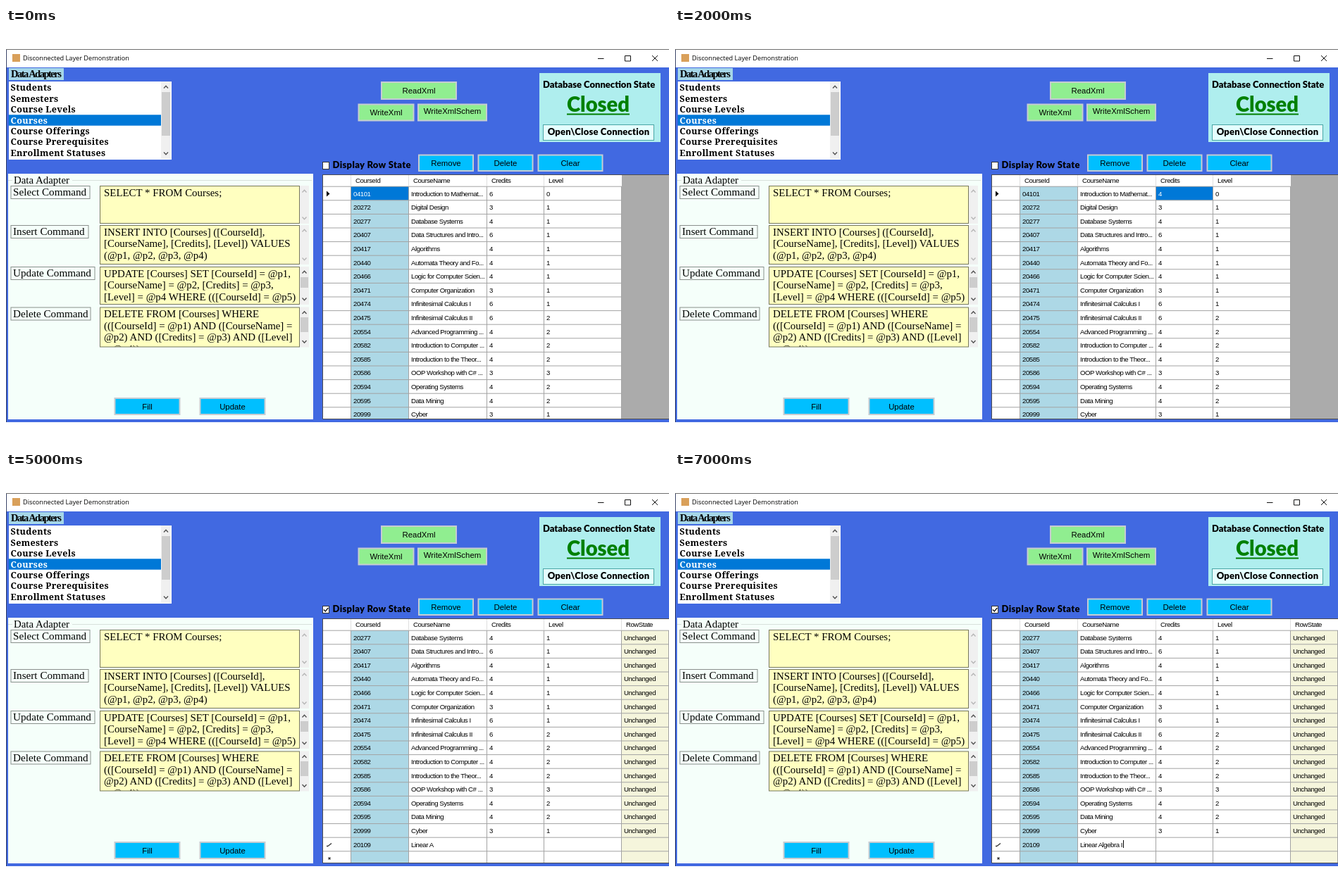
These frames come from a looping animation (941 px wide and 591 px high, 8000 ms). An HTML page:

```html
<!DOCTYPE html>
<html lang="en">
<head>
<meta charset="utf-8">
<title>Disconnected Layer Demonstration</title>
<style>
  html, body { margin: 0; width: 100%; height: 100%; overflow: hidden; background: #fff; }
  svg { display: block; }
  text { white-space: pre; }
  .title { font: 9.2px "Open Sans", sans-serif; }
  .heading { font: bold 14.5px "Liberation Serif", serif; letter-spacing: -1.5px; }
  .list { font: 900 12.6px "Noto Serif", serif; letter-spacing: .3px; }
  .geo { font: 900 13px Lato, sans-serif; }
  .button { font: 11.4px "Liberation Sans", sans-serif; text-anchor: middle; }
  .serif { font: 14.9px "Liberation Serif", serif; }
  .cell { font: 9.6px "Liberation Sans", sans-serif; letter-spacing: -.45px; }
</style>
</head>
<body>
<svg id="stage" width="941" height="591" viewBox="0 0 941 591"></svg>
<script>
const rect = (x, y, w, h, fill, stroke = 'none', width = 1) =>
  `<rect x="${x}" y="${y}" width="${w}" height="${h}" fill="${fill}" stroke="${stroke}" stroke-width="${width}"/>`;
const text = (cls, x, y, s, fill = '#000', style = '') =>
  `<text class="${cls}" x="${x}" y="${y}" fill="${fill}" style="${style}">${s}</text>`;
const path = (d, stroke, width = 1, fill = 'none') =>
  `<path d="${d}" stroke="${stroke}" stroke-width="${width}" fill="${fill}"/>`;
const clip = (id, x, y, w, h) => `<clipPath id="${id}">${rect(x, y, w, h, '#000')}</clipPath>`;

function button(x, y, w, h, label, fill = '#00bfff', dy = 4) {
  return rect(x + 1, y + 1, w - 2, h - 2, fill, '#c6ccd2', 2) +
    text('button', x + w / 2, y + h / 2 + dy, label);
}

function scrollbar(x, y, w, h, thumb) {
  const cx = x + w / 2, color = thumb ? '#505050' : '#b5b5b5';
  const arrow = (cy, d) => path(`M${cx - 3} ${cy + d}L${cx} ${cy - d * 1.2}L${cx + 3} ${cy + d}`, color, 1.3);
  return rect(x, y, w, h, '#f0f0f0') + arrow(y + 8, 1.5) + arrow(y + h - 8, -1.5) +
    (thumb ? rect(x + 1, thumb[0], w - 2, thumb[1], '#cdcdcd') : '');
}

function command(name, labelWidth, y, h, lines, thumb) {
  const id = 'clip' + name;
  return rect(7, y + .5, labelWidth, 18, 'none', '#8a8f8c') +
    text('serif', 10, y + 14, name + ' Command', '#000', 'font-size:15.2px') +
    rect(133.5, y + .5, 283, h - 1, '#ffffc0', '#77775c') +
    clip(id, 134, y + 1, 282, h - 2) + `<g clip-path="url(#${id})">` +
    lines.map((s, i) => text('serif', 139, y + 14.8 + 16.4 * i, s)).join('') + '</g>' +
    scrollbar(417, y, 13, h, thumb);
}

function windowFrame() {
  return rect(0, 30, 941, 530, '#4169e1') + rect(0, 31, 941, 25, '#fff') +
    rect(0, 30, 941, 1, '#6e6e6e') + rect(0, 31, 1, 529, '#3a4468') +
    rect(9, 37, 11, 11, '#d9a05a') +
    text('title', 24, 46.3, 'Disconnected Layer Demonstration') +
    path('M840 43.5h8.5M878.5 39.5h8v7.5h-8zM917 39l8 8M925 39l-8 8', '#111');
}

function adapterList() {
  const names = ['Students', 'Semesters', 'Course Levels', 'Courses', 'Course Offerings',
    'Course Prerequisites', 'Enrollment Statuses'];
  return rect(4, 57, 78, 17, '#a5d6e8') + text('heading', 7, 70, 'Data Adapters') +
    rect(4, 76, 231, 111, '#fff') + rect(4, 123.3, 216, 15.4, '#0078d7') +
    names.map((s, i) => text('list', 6.5, 89.2 + 15.45 * i, s, i === 3 ? '#fff' : '#000')).join('') +
    scrollbar(220, 76, 14, 110, [91, 62]);
}

function connectionPanel() {
  return rect(757, 64, 172, 98, '#afeeee') +
    text('geo', 762, 85, 'Database Connection State') +
    text('geo', 840.5, 118.5, 'Closed', '#008000', 'font-size:29.2px;text-anchor:middle') +
    rect(796, 121.5, 89, 2, '#008000') +
    rect(762.5, 137.5, 157, 22, '#e4ffff', '#4aa5a5') +
    text('geo', 841, 152, 'Open\\Close Connection', '#000', 'letter-spacing:.2px;text-anchor:middle');
}

function adapterPanel() {
  return rect(3, 207, 433, 349, '#f5fffa') +
    path('M3 216.5h6M94 216.5h340', '#d8e0dc') + text('serif', 11, 220.5, 'Data Adapter') +
    command('Select', 112, 224, 54, ['SELECT * FROM Courses;']) +
    command('Insert', 110, 280, 56, ['INSERT INTO [Courses] ([CourseId],',
      '[CourseName], [Credits], [Level]) VALUES', '(@p1, @p2, @p3, @p4)']) +
    command('Update', 119, 339, 54, ['UPDATE [Courses] SET [CourseId] = @p1,',
      '[CourseName] = @p2, [Credits] = @p3,', '[Level] = @p4 WHERE (([CourseId] = @p5)'], [354, 15]) +
    command('Delete', 113, 396.5, 57, ['DELETE FROM [Courses] WHERE',
      '(([CourseId] = @p1) AND ([CourseName] =', '@p2) AND ([Credits] = @p3) AND ([Level]',
      '= @p4))'], [411, 21]) +
    button(153.5, 525, 94, 25, 'Fill') + button(274.5, 525, 94, 25, 'Update');
}

const green = '#90ee90';
const background = windowFrame() + adapterList() + connectionPanel() + adapterPanel() +
  button(532, 76, 108, 26, 'ReadXml', green) + button(499.5, 107.5, 80, 25, 'WriteXml', green) +
  button(584, 107.5, 99, 25, 'WriteXmlSchem', green, 2) +
  button(585, 179.5, 79, 24.5, 'Remove') + button(669.5, 179.5, 79, 24.5, 'Delete') +
  button(754.5, 179.5, 93, 24.5, 'Clear') +
  rect(449.5, 190.5, 9, 10, '#fff', '#333') +
  text('geo', 463.5, 199, 'Display Row State', '#000', 'letter-spacing:.35px') +
  clip('grid', 449, 208, 492, 347);

// id, name, credits, level
const courses = `04101|Introduction to Mathemat...|6|0
20272|Digital Design|3|1
20277|Database Systems|4|1
20407|Data Structures and Intro...|6|1
20417|Algorithms|4|1
20440|Automata Theory and Fo...|4|1
20466|Logic for Computer Scien...|4|1
20471|Computer Organization|3|1
20474|Infinitesimal Calculus I|6|1
20475|Infinitesimal Calculus II|6|2
20554|Advanced Programming ...|4|2
20582|Introduction to Computer ...|4|2
20585|Introduction to the Theor...|4|2
20586|OOP Workshop with C# ...|3|3
20594|Operating Systems|4|2
20595|Data Mining|4|2
20999|Cyber|3|1`.split('\n').map(line => line.split('|'));

const headers = ['CourseId', 'CourseName', 'Credits', 'Level', 'RowState'];
const edges = [490, 572, 683, 764, 874, 941];
const top0 = 225, rowHeight = 19.6;

// One state per second
const states = [
  { selected: 0, credits: '6' },
  { selected: 2, credits: '6' },
  { selected: 2, credits: '4' },
  { selected: 2, credits: '4', rowState: true, hover: 1 },
  { selected: 4, credits: '4', rowState: true },
  { typed: 'Linear A', rowState: true },
  { typed: 'Linear Algebra', rowState: true },
  { typed: 'Linear Algebra I', rowState: true, caret: true }
];

function rowsFor({ typed, credits }) {
  const rows = courses.map(row => [...row, 'Unchanged']);
  if (typed) return [...rows.slice(2), ['20109', typed, '', '', ''], ['', '', '', '', '']];
  rows[0][2] = credits;
  rows[0][4] = 'Modified';
  return rows;
}

function grid(state) {
  const columns = state.rowState ? 5 : 4, right = edges[columns];
  let out = rect(449, 208, 492, 348, '#ababab') + rect(449, 208, right - 449, 347, '#fff') +
    rect(490, top0, 82, 331, '#add8e6');
  if (state.rowState) out += rect(874, top0, 67, 331, '#f5f5dc');
  if (state.hover) out += rect(edges[state.hover], 208, 111, 17, '#d9ebf9');
  headers.slice(0, columns).forEach((s, c) => out += text('cell', edges[c] + 6, 220.2, s));
  rowsFor(state).forEach((row, r) => {
    const y = top0 + r * rowHeight;
    row.slice(0, columns).forEach((s, c) => {
      const selected = r === 0 && c === state.selected;
      if (selected) out += rect(edges[c], y, edges[c + 1] - edges[c], rowHeight, '#0078d7');
      out += text('cell', edges[c] + 3, y + 13.5, s, selected ? '#fff' : '#000');
    });
  });
  let lines = '';
  for (let r = 0; r < 17; r++) lines += `M449 ${top0 + .2 + r * rowHeight}H${right}`;
  for (const x of edges.slice(0, columns + 1)) lines += `M${x - .5} ${top0}V555`;
  out += path(lines, '#a3a3a3') +
    path(edges.slice(0, columns).map(x => `M${x - .5} 208v17`).join(''), '#dedede');
  out += state.typed
    ? path('M455 531.5h2M457 531.5l5-4', '#333', 1.3) +
      path('M457 549h4M459 547v4M457.5 547.5l3 3M460.5 547.5l-3 3', '#222', .8)
    : path('M455 231.5l4.5 4-4.5 4z', 'none', 0, '#000');
  if (state.caret) out += path('M636.5 523v11', '#000');
  return `<g clip-path="url(#grid)">${out}</g>` +
    path('M449.5 208V555.5H941M449 208.5H941', '#4c4c50') +
    (state.rowState ? path('M451 195.5l2.3 2.5 4-5', '#111', 1.3) : '');
}

const stage = document.getElementById('stage');
stage.innerHTML = background + '<g id="live"></g>';
const live = document.getElementById('live');
let shown = -1;

function draw(now) {
  const step = Math.floor(now % 8000 / 1000);
  if (step !== shown) live.innerHTML = grid(states[shown = step]);
  requestAnimationFrame(draw);
}
draw(performance.now());
</script>
</body>
</html>
```
